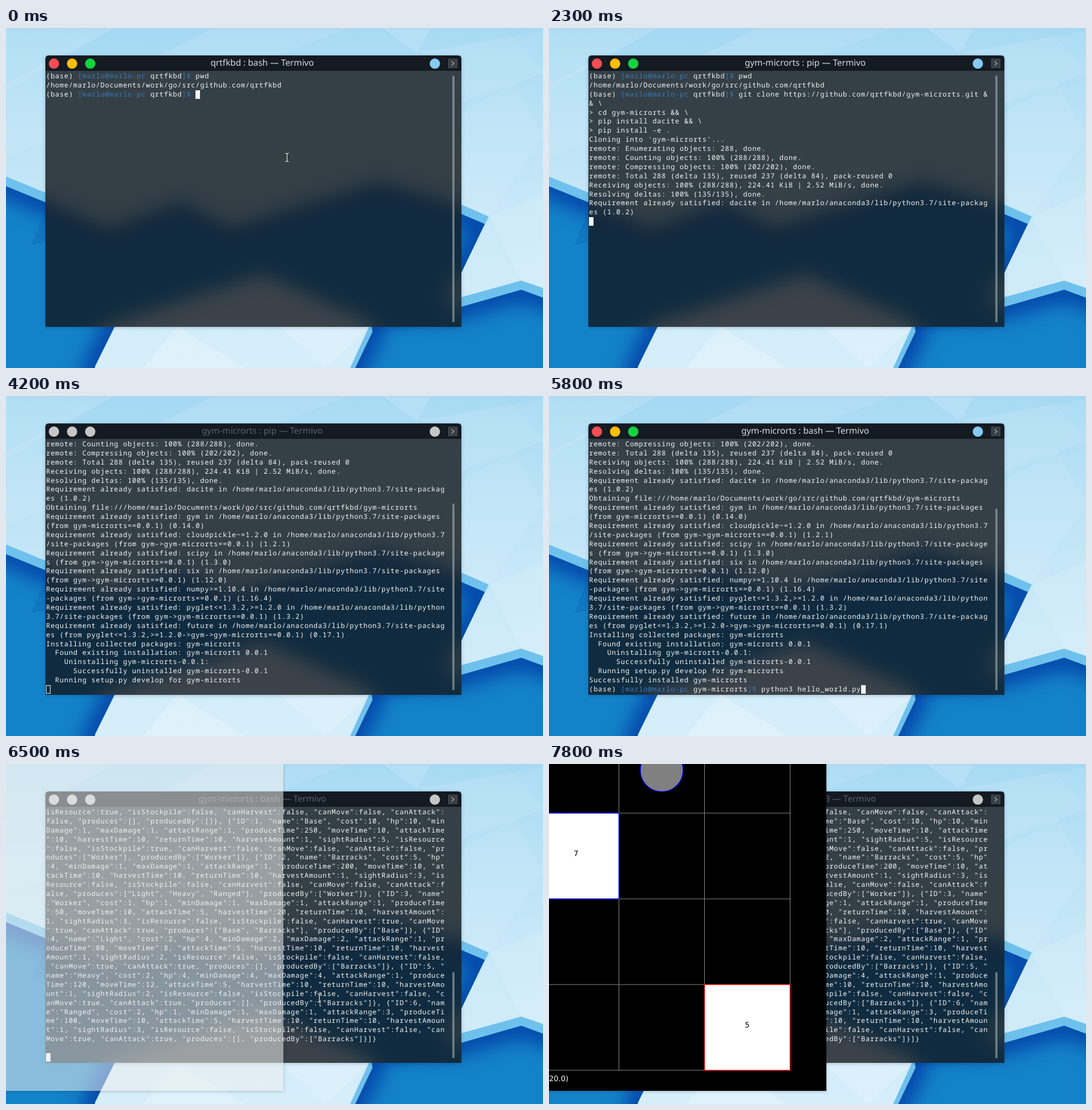
Write an HTML page that moves like this. It is 941 by 595 pixels and loops after 8 s.

```html
<!DOCTYPE html>
<html lang="en">
<head>
<meta charset="utf-8">
<title>Terminal session</title>
<style>
  html, body { margin: 0; width: 100%; height: 100%; overflow: hidden; }
  #stage { position: relative; width: 941px; height: 595px; overflow: hidden; text-rendering: geometricPrecision; }
  #stage > * { position: absolute; left: 0; top: 0; }
  #title {
    left: 149px; top: 48px; width: 600px; line-height: 27px; text-align: center;
    font-family: "Noto Sans", sans-serif; font-size: 15.3px; color: #d9dde0; white-space: pre;
  }
  #term {
    margin: 0; left: 70.2px; top: 76px;
    font: 12px/15.89px "Noto Sans Mono", monospace; letter-spacing: .743px; color: #f4f6f7;
  }
  #term i { font-style: normal; color: #3a7ab6; }
  #cursor { width: 8px; height: 15px; box-sizing: border-box; background: #f4f6f7; }
  #cursor.hollow { background: none; border: 1px solid #f4f6f7; }
  #bar { left: 782px; width: 4px; border-radius: 2px; background: rgba(160, 170, 176, .6); }
  .lamp { fill: var(--c); }
  .idle .lamp { fill: #c6c6c6; }
  .idle #title { color: #5b6167; }
  filter { color-interpolation-filters: sRGB; }
  #game { width: 486px; height: 572px; overflow: hidden; box-shadow: 0 1px 5px rgba(20, 40, 60, .25); }
  #game svg { display: block; font: 13px "DejaVu Sans", sans-serif; }
</style>
</head>
<body>
<div id="stage">
  <svg width="941" height="595">
    <defs>
      <linearGradient id="sky" x2="0" y2="1">
        <stop offset="0" stop-color="#a8daf3"/>
        <stop offset=".3" stop-color="#bce3f6"/>
        <stop offset=".65" stop-color="#cdeaf8"/>
        <stop offset="1" stop-color="#d6eefa"/>
      </linearGradient>
      <path id="left" d="M-90 241L0 277 69 305 320 405 200 503 156 592 140 700H-90Z"/>
      <path id="right" d="M690 280L839 343 798 428 700 480Z"/>
      <path id="low" d="M642 531L636 500 798 488 903 458 941 472 1040 505V700H560Z"/>
      <clipPath id="blues">
        <use href="#left"/><use href="#right"/><use href="#low"/>
      </clipPath>
      <clipPath id="pane"><rect x="69" y="75" width="729" height="448"/></clipPath>
      <filter id="soft" x="-20%" y="-20%" width="140%" height="140%"><feGaussianBlur stdDeviation="16"/></filter>
      <filter id="shade" x="-10%" y="-10%" width="120%" height="120%"><feGaussianBlur stdDeviation="3"/></filter>
    </defs>

    <rect width="941" height="595" fill="url(#sky)"/>
    <g fill="#fff">
      <path opacity=".1" d="M0 0H190L0 110Z"/>
      <path opacity=".08" d="M0 100L69 60V200L0 225Z"/>
      <path opacity=".08" d="M365 0H600L480 48H270Z"/>
      <path opacity=".12" d="M660 0H745L720 44Z"/>
      <path opacity=".1" d="M720 44L941 5V80L798 130V48Z"/>
      <path opacity=".07" d="M798 150L890 95 941 190 846 330 798 310Z"/>
      <path opacity=".1" d="M846 330L941 290V455L903 442Z"/>
      <path opacity=".2" d="M300 523L420 595H240Z"/>
      <path opacity=".15" d="M480 523H636L560 595Z"/>
    </g>
    <g fill="#8ccbee" opacity=".12">
      <path d="M190 0H365L270 48H100Z"/>
      <path d="M870 0H941V70Z"/>
    </g>
    <g fill="#6fc1ed">
      <path d="M0 260L69 288V306L0 278Z"/>
      <path d="M798 309L846 330 839 344 798 327Z"/>
      <path d="M798 471L903 442 941 455V474L903 459 798 489Z"/>
    </g>
    <g clip-path="url(#blues)">
      <rect width="941" height="595" fill="#1382c8"/>
      <g fill="none" stroke="#0445a8" stroke-width="40" filter="url(#soft)">
        <use href="#left"/><use href="#right"/><use href="#low"/>
      </g>
      <path d="M69 320L45 380 69 375Z" fill="#0b5fae" opacity=".3"/>
    </g>
    <path d="M636 523H641L642 532 612 595H603Z" fill="#6fc1ed"/>
    <path d="M0 .5H941" stroke="#b9cfdb"/>

    <rect x="69" y="50" width="729" height="474" rx="5" fill="#0a2438" opacity=".25" filter="url(#shade)"/>
    <g clip-path="url(#pane)">
      <rect x="69" y="75" width="729" height="448" fill="#343f46"/>
      <g filter="url(#soft)">
        <path d="M20 285L69 302 180 350 305 304 395 348 655 268 850 325V580H20Z" fill="#102b3f"/>
        <path d="M20 305L69 322 180 370 305 324 395 368 655 288 850 345" fill="none" stroke="#13273c" stroke-width="24"/>
        <path d="M150 540L190 515 450 432 640 515 660 560H150Z" fill="#3b4249"/>
        <path d="M840 400L785 440 765 480 840 505Z" fill="#39434b" opacity=".7"/>
      </g>
    </g>
    <path d="M69 75V54Q69 48 75 48H792Q798 48 798 54V75Z" fill="#141a21"/>
    <rect x="775.5" y="54.5" width="15" height="15" fill="#373f44" stroke="#4b5357"/>
    <path d="M781 58.5L785 62 781 65.5" fill="none" stroke="#aeb4b7" stroke-width="1.2"/>
  </svg>

  <svg width="941" height="80">
    <circle class="lamp" style="--c:#fa4d53" cx="84" cy="62.3" r="9"/>
    <circle class="lamp" style="--c:#fdbd0b" cx="115.8" cy="62.3" r="9"/>
    <circle class="lamp" style="--c:#13d33e" cx="147.6" cy="62.3" r="9"/>
    <circle class="lamp" style="--c:#86caf5" cx="751.5" cy="62.3" r="9"/>
  </svg>
  <div id="title"></div>
  <pre id="term"></pre>
  <div id="cursor"></div>
  <div id="bar"></div>
  <div id="game"></div>
  <svg id="mouse" width="8" height="18" fill="none">
    <path id="beam" d="M1 1.8H3L4 2.8 5 1.8H7M4 2.8V15.2M1 16.2H3L4 15.2 5 16.2H7" stroke="#1b2226" stroke-width="2.4"/>
    <use href="#beam" style="stroke:#fff"/>
    <path d="M1 1.8H3L4 2.8 5 1.8H7M4 2.8V15.2M1 16.2H3L4 15.2 5 16.2H7" stroke="#fff" stroke-width="1.2"/>
  </svg>
</div>

<script>
const LOOP = 8000, COLS = 88, ROWS = 28, CELL_W = 7.943, CELL_H = 15.89;
const USER = 'marlo', ORG = 'qrtfkbd', APP = 'Termivo';
const $ = id => document.getElementById(id);

const wrap = text => text.match(new RegExp(`.{1,${COLS}}`, 'g')) || [''];
const prompt = dir => `(base) [${USER}@${USER}-pc ${dir}]$ `;
const home = `/home/${USER}`;
const work = `${home}/Documents/work/go/src/github.com/${ORG}`;
const met = (name, rest) =>
  `Requirement already satisfied: ${name} in ${home}/anaconda3/lib/python3.7/site-packages ${rest}`;
const dep = (name, version, via = 'gym->') => met(name, `(from ${via}gym-microrts==0.0.1) (${version})`);

// Unit table printed by the game as JSON.
const KEYS = ['cost', 'hp', 'minDamage', 'maxDamage', 'attackRange', 'produceTime', 'moveTime',
  'attackTime', 'harvestTime', 'returnTime', 'harvestAmount', 'sightRadius'];
const FLAGS = ['isResource', 'isStockpile', 'canHarvest', 'canMove', 'canAttack'];
const UNITS = [
  ['Base', '10 10 1 1 1 250 10 10 10 10 1 5', '01000', 'Worker', 'Worker'],
  ['Barracks', '5 4 1 1 1 200 10 10 10 10 1 3', '00000', 'Light Heavy Ranged', 'Worker'],
  ['Worker', '1 1 1 1 1 50 10 5 20 10 1 3', '00111', 'Base Barracks', 'Base'],
  ['Light', '2 4 2 2 1 80 8 5 10 10 1 2', '00011', '', 'Barracks'],
  ['Heavy', '2 4 4 4 1 120 12 5 10 10 1 2', '00011', '', 'Barracks'],
  ['Ranged', '2 1 1 1 3 100 10 5 10 10 1 3', '00011', '', 'Barracks'],
];
const names = s => `[${s.split(' ').filter(Boolean).map(n => `"${n}"`).join(', ')}]`;
const flags = bits => FLAGS.map((f, i) => `"${f}":${bits[i] === '1'}`).join(', ');
const unit = ([name, nums, bits, makes, by], i) => {
  const n = nums.split(' ');
  return `{"ID":${i + 1}, "name":"${name}", ${KEYS.map((k, j) => `"${k}":${n[j]}`).join(', ')}, ` +
    `${flags(bits)}, "produces":${names(makes)}, "producedBy":${names(by)}}`;
};
const json = `${flags('10000').slice(1)}, "produces":[], "producedBy":[]}, ${UNITS.map(unit).join(', ')}]}`;

const LOG = [
  prompt(ORG) + 'pwd',
  work,
  prompt(ORG) + `git clone https://github.com/${ORG}/gym-microrts.git && \\`,
  '> cd gym-microrts && \\',
  '> pip install dacite && \\',
  '> pip install -e .',
  "Cloning into 'gym-microrts'...",
  'remote: Enumerating objects: 288, done.',
  'remote: Counting objects: 100% (288/288), done.',
  'remote: Compressing objects: 100% (202/202), done.',
  'remote: Total 288 (delta 135), reused 237 (delta 84), pack-reused 0',
  'Receiving objects: 100% (288/288), 224.41 KiB | 2.52 MiB/s, done.',
  'Resolving deltas: 100% (135/135), done.',
  met('dacite', '(1.0.2)'),
  `Obtaining file://${work}/gym-microrts`,
  dep('gym', '0.14.0', ''),
  dep('cloudpickle~=1.2.0', '1.2.1'),
  dep('scipy', '1.3.0'),
  dep('six', '1.12.0'),
  dep('numpy>=1.10.4', '1.16.4'),
  dep('pyglet<=1.3.2,>=1.2.0', '1.3.2'),
  dep('future', '0.17.1', 'pyglet<=1.3.2,>=1.2.0->gym->'),
  'Installing collected packages: gym-microrts',
  '  Found existing installation: gym-microrts 0.0.1',
  '    Uninstalling gym-microrts-0.0.1:',
  '      Successfully uninstalled gym-microrts-0.0.1',
  '  Running setup.py develop for gym-microrts',
  'Successfully installed gym-microrts',
  prompt('gym-microrts') + 'python3 hello_world.py',
  ...Array(14).fill(''),
  json,
  '', '',
].flatMap(wrap);
const END = LOG.length - 1;

// row / col: cursor place in the log; each step changes only what it names.
const REST = [549, 409.5];
const STEPS = [
  [0, { row: 2, col: prompt(ORG).length, title: `${ORG} : bash`, idle: false, hollow: false, mouse: [492.5, 226.5], game: null }],
  [300, { mouse: null }],
  [1100, { row: 6, col: COLS }],
  [1600, { row: 8, col: 0 }],
  [1900, { row: 9, title: `${ORG} : git` }],
  [2000, { row: 11 }],
  [2100, { row: 13 }],
  [2200, { row: 14, title: 'gym-microrts : pip' }],
  [2300, { row: 16 }],
  [3300, { row: 17 }],
  [3400, { idle: true, hollow: true }],
  [3600, { row: 31 }],
  [3900, { row: 32 }],
  [4200, { row: 36 }],
  [4600, { idle: false, hollow: false }],
  ...[0, 1, 2, 3, 4, 5].map(i => [4700 + i * 100, { mouse: [492.5 + i * 11.3, 226.5 + i * 36.6] }]),
  [4800, { row: 37, col: prompt('gym-microrts').length, title: 'gym-microrts : bash' }],
  [5500, { mouse: null }],
  [5800, { col: COLS }],
  [6200, { row: 38, col: 0 }],
  [6400, { row: END, idle: true, mouse: REST, game: { alpha: .2 } }],
  [6500, { game: { alpha: .54 } }],
  [6600, { title: 'gym-microrts : python3', game: { alpha: .9 } }],
  [6700, { game: { size: 159, base: 5, at: 0, edge: 2 } }],
  [6800, { game: { size: 159, base: 5, at: 0 } }],
  [7300, { mouse: null, game: { size: 150, base: 5, at: 0 } }],
  [7400, { game: { size: 150, base: 6, at: 0 } }],
  [7500, { game: { size: 150, base: 7, at: 0 } }],
  [7600, { game: { size: 150, base: 7, at: 1 } }],
  [7800, { game: { size: 150, base: 7, at: 0 } }],
].sort((a, b) => a[0] - b[0]);

const paint = s => s.replace(/&/g, '&amp;').replace(/</g, '&lt;')
  .replace(/\[\w+@\w+-pc|\]\$/g, '<i>$&</i>');

function board({ size: s, base, at, edge = 0 }) {
  const x = 122.5, wide = s > 155, y = wide ? 532.5 : 536;
  const right = x + 2 * s;
  let lines = '';
  for (let i = 0; i < 3; i++) lines += `M${x + i * s} 0V${y}`;
  for (let i = 0; i < 4; i++) lines += `M0 ${y - i * s}H${right}`;
  const box = (cx, cy, color, n) =>
    `<rect x="${cx}" y="${cy}" width="${s}" height="${s}" fill="#fff" stroke="${color}" stroke-width="1.4"/>
     <text x="${cx + s / 2}" y="${cy + s / 2}" text-anchor="middle">${n}</text>`;
  return `<svg width="486" height="572">
    <rect width="${486 - edge}" height="${572 - edge}"/>
    <path d="${lines}" stroke="#888" fill="none"/>
    ${box(x - s, y - 3 * s, '#00f', base)}
    ${box(x + s, y - s, '#f00', 5)}
    <circle cx="${x + s * (at + .5)}" cy="${y - 3.5 * s}" r="${s / 4}" fill="#808080" stroke="#00f" stroke-width="1.3"/>
    <text x="${wide ? 1.5 : 34}" y="${wide ? 553 : 555}" text-anchor="end" fill="#fff">(20.0, 20.0)</text>
  </svg>`;
}

function draw({ row, col, title, idle, hollow, mouse, game }) {
  const top = Math.max(0, row - ROWS + 1);
  const typed = LOG[row].slice(0, col);
  $('term').innerHTML = [...LOG.slice(top, row), typed].map(paint).join('\n');
  $('title').textContent = `${title} — ${APP}`;
  $('stage').className = idle ? 'idle' : '';

  const cur = $('cursor');
  cur.className = hollow ? 'hollow' : '';
  cur.style.left = `${70.2 + typed.length * CELL_W}px`;
  cur.style.top = `${77.2 + (row - top) * CELL_H}px`;

  const len = 432 * Math.min(1, ROWS / (row + 1));
  $('bar').style.top = `${515 - len}px`;
  $('bar').style.height = `${len}px`;

  $('mouse').style.display = mouse ? '' : 'none';
  if (mouse) $('mouse').style.transform = `translate(${mouse[0] - 4}px, ${mouse[1] - 9}px)`;

  const win = $('game');
  win.style.display = game ? '' : 'none';
  if (game) {
    win.style.background = `rgba(239, 240, 241, ${game.alpha ?? 1})`;
    win.innerHTML = game.size ? board(game) : '';
  }
}

let shown = -1;
function tick(now) {
  const t = now % LOOP;
  const count = STEPS.filter(([at]) => at <= t).length;
  if (count !== shown) {
    shown = count;
    draw(Object.assign({}, ...STEPS.slice(0, count).map(s => s[1])));
  }
  requestAnimationFrame(tick);
}
tick(performance.now());
</script>
</body>
</html>
```
